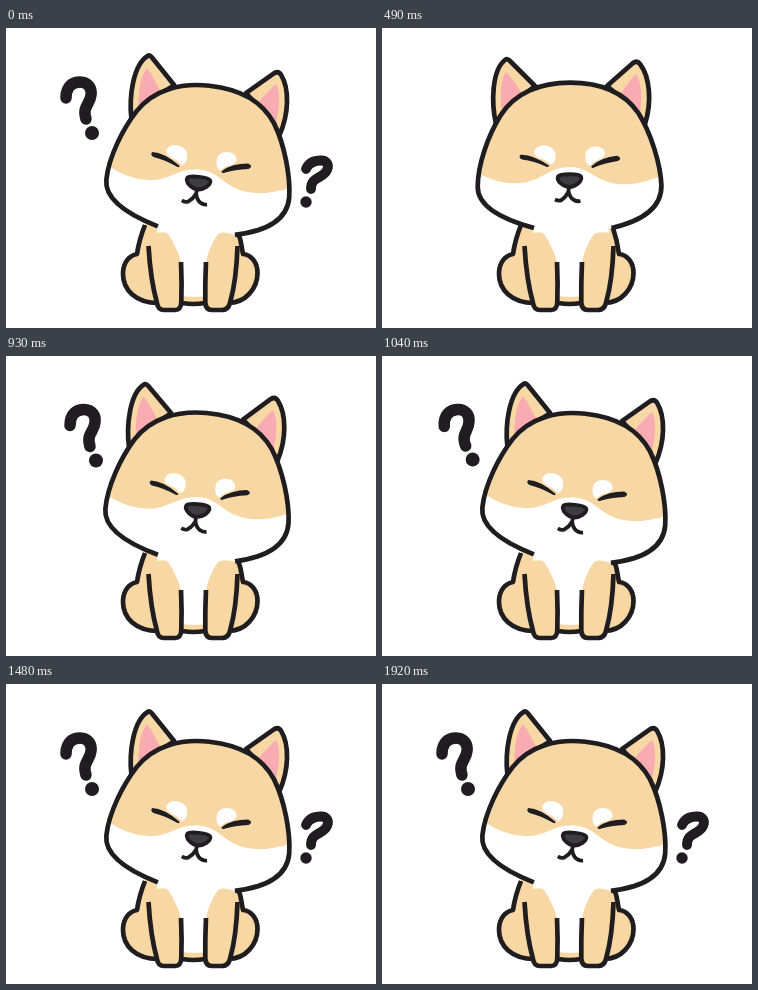
An HTML page with a canvas that plays this animation: 370x300 px, repeating every 1970 ms.

```html
<!DOCTYPE html>
<html lang="en">
<head>
<meta charset="utf-8">
<title>Puzzled puppy</title>
<style>
html, body { margin: 0; width: 100%; height: 100%; overflow: hidden; background: #fff; }
canvas { display: block; }
</style>
</head>
<body>
<canvas id="stage" width="370" height="300"></canvas>
<script>
const ctx = document.getElementById('stage').getContext('2d');
const INK = '#1f1d1f', TAN = '#f7d8a5', PINK = '#f8abb1', WHITE = '#fff', GREY = '#3e3d3f';
const LOOP = 1970, STEP = 110, LAST = 14;

const path = d => new Path2D(d);
const headEdge = 'M152 200 C130 194 95.7 182 95.7 159 C95.7 136 106.5 107 118.5 87.5 C133 64.5 159 54.6 188 54.6 C218 54.6 242 64 256.3 85 C269 105 278.5 136 279.4 157 C280 182 256 194 229.5 200';
const haunches = 'M139 197 Q133 212 131 226 C121 228 117 237 117 246 C117 262 130 275 152 275';
const flank = 'M231 200 Q235 212 237 226 C246 227 251.5 235 251.5 245 C251.5 260 240 275 222 275';
const leftLeg = 'M142.5 218 Q144.5 252 151 275 Q152 282 158 282 L169 282 Q175 282 175.3 274 Q176 255 175 234';
const rightLeg = 'M231.5 218 Q230.5 252 224 275 Q222 282 216 282 L206 282 Q199.5 282 199.3 274 Q199 255 200 234';

const shape = {
  body: path('M139 196 Q133 212 131 226 C121 228 117 237 117 246 C117 262 128 275 152 275 L222 275 C240 276 251 260 251 245 C251 235 246 227 237 226 Q235 212 230 196 Z'),
  chest: path('M146 190 L152 205 Q159 203 162 206 Q171 219 175 234 L176 268 Q188 270 200 268 L200 234 Q203 219 212 206 Q217 203 227 205 L226 190 Z'),
  paws: path(leftLeg + ' Z ' + rightLeg + ' Z'),
  bodyLines: path(haunches + flank + ' M176 275 Q188 277 199 275'),
  legLines: path(leftLeg + rightLeg),
  ears: path('M114 96 C109 74 110 42 123 32 Q125 30 128 33 L153 58 L130 76 Z M225 58 L251 35 Q255 32 258 36 C268 49 270 74 263 96 L246 76 Z'),
  earPink: path('M120 86 C118 70 118 52 124 44 Q131 51 140 66 Z M238 67 Q246 54 254 46 C260 55 260 70 258 85 Z'),
  head: path(headEdge + ' Q188 194 152 200 Z'),
  outline: path(headEdge),
  cap: path('M85 30 L85 137 C104 152.5 123 156.5 141 154.8 C160 152 168 139 188 139 C206 139 212 151.5 232 155.5 C250 158.5 268 153.5 290 143 L290 30 Z'),
  brows: path('M152.3 124 C153 116 167 115 172.3 122.5 C175.5 130 172 138 168 136 C162 129 152 131 152.3 124 Z M223 125 C222 117 208 116 204 124 C202 131 205 139 209 137 C214 130 223 132 223 125 Z'),
  eyes: path('M138.5 126.8 Q150 126 167 137.5 Q167 139.5 164.5 138.7 Q152 133 140 131.5 Q136 129.5 138.5 126.8 Z M235 127.8 Q219 129.5 209.5 138 Q209 140.5 211.5 139.7 Q222 135 236 133 Q241 130 235 127.8 Z'),
  nose: path('M176 148.5 C178 145.5 197 145.5 199 148.5 C201 153 193 159 187.3 159 C181.5 159 174 153 176 148.5 Z'),
  mouth: path('M186.7 160 L186.5 163.5 Q184 169 179.5 172 Q177 173.5 173 171.5 M186.5 163.5 Q188 170 192 172 Q195 173.8 198.5 173'),
  leftHook: path('M60 70 C60 58 67 54 74 54 C82 54 86 60 85 67 C84 77 76 78 80 91'),
  rightHook: path('M300 141 C303 134 309 132.5 315 132.5 C321 132.5 323.5 137 321 142 C317 151 305 148 305 161')
};

function fill(p, color) {
  ctx.fillStyle = color;
  ctx.fill(p);
}

function line(p, width = 4.7, cap = 'butt') {
  ctx.strokeStyle = INK;
  ctx.lineWidth = width;
  ctx.lineCap = cap;
  ctx.lineJoin = 'round';
  ctx.stroke(p);
}

function turned(deg, x, y, dx, dy, draw) {
  ctx.save();
  ctx.translate(x + dx, y + dy);
  ctx.rotate(deg * Math.PI / 180);
  ctx.translate(-x, -y);
  draw();
  ctx.restore();
}

function drawBody() {
  fill(shape.body, TAN);
  fill(shape.paws, TAN);
  fill(shape.chest, WHITE);
  line(shape.bodyLines);
  line(shape.legLines);
}

function drawHead() {
  fill(shape.ears, TAN);
  fill(shape.earPink, PINK);
  line(shape.ears);
  fill(shape.head, WHITE);
  ctx.save();
  ctx.clip(shape.head);
  fill(shape.cap, TAN);
  ctx.restore();
  line(shape.outline);
  fill(shape.brows, WHITE);
  fill(shape.eyes, INK);
  fill(shape.nose, GREY);
  line(shape.nose, 3.8);
  line(shape.mouth, 3.8);
}

function drawMark(hook, width, x, y, r) {
  line(hook, width, 'round');
  ctx.fillStyle = INK;
  ctx.beginPath();
  ctx.arc(x, y, r, 0, 7);
  ctx.fill();
}

const swing = n => Math.cos(n * Math.PI / 2);

function drawMarks(s) {
  if (s >= 5) {
    const entry = Math.max(0, (8 - s) / 3);
    const angle = s < 8 ? -12 * (1 - entry) : -6 - 6 * swing(s - 8);
    turned(angle, 70, 76, 4 * entry, -0.5 * entry, () => drawMark(shape.leftHook, 11.5, 86, 105, 7));
  }
  if (s >= 8) {
    const entry = Math.max(0, (10 - s) / 2);
    const angle = s < 10 ? -4 * entry : -6 * swing(s - 11);
    turned(angle, 311, 152, -entry, 0, () => drawMark(shape.rightHook, 9.8, 300, 174, 5.7));
  }
}

// The puppy rests upright first, then moves in even hard steps.
function stepAt(t) {
  if (t < 50) return LAST;
  if (t < 490) return 0;
  return Math.min(LAST, Math.floor((t - 490) / STEP) + 1);
}

function render(now) {
  const s = stepAt(now % LOOP);
  ctx.fillStyle = WHITE;
  ctx.fillRect(0, 0, 370, 300);
  drawBody();
  turned(1.25 * (Math.min(s, 6) - 1), 167, 198, 0, 0, drawHead);
  drawMarks(s);
}

let start;
function tick(now) {
  start ??= now;
  render(now - start);
  requestAnimationFrame(tick);
}
render(0);
requestAnimationFrame(tick);
</script>
</body>
</html>
```
